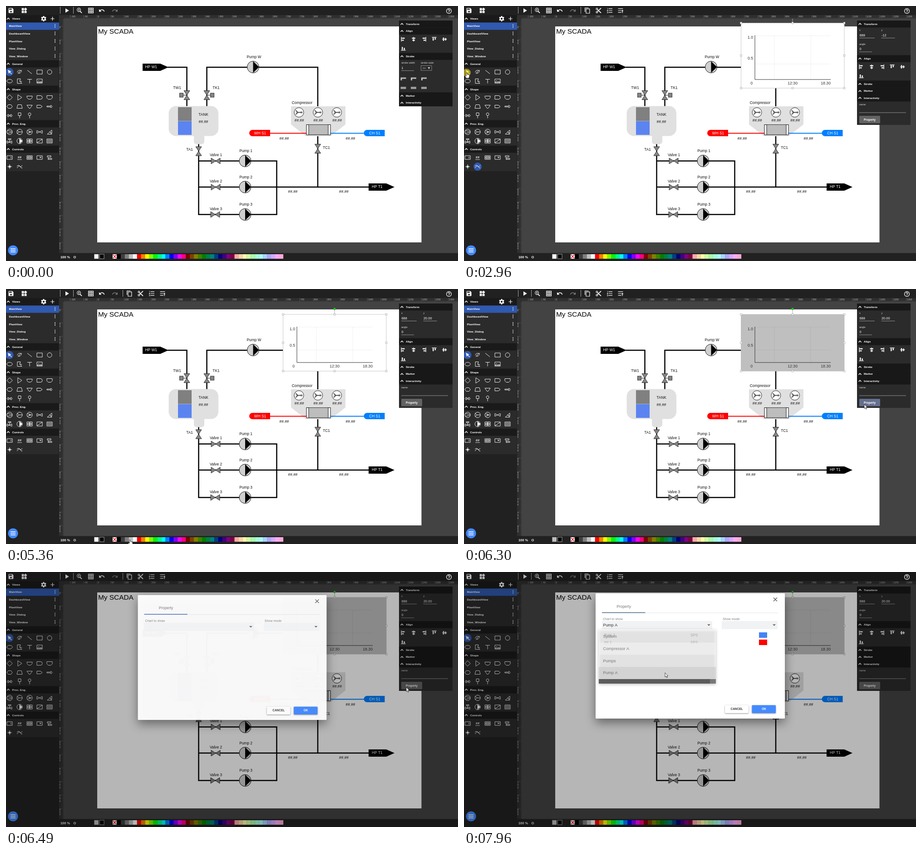
Animation of 996x562 px, one loop 8 s. Source, as an HTML page with a canvas:

```html
<!DOCTYPE html>
<html lang="en">
<head>
<meta charset="utf-8">
<title>View editor</title>
<style>
html, body { margin: 0; width: 100%; height: 100%; overflow: hidden; background: #434343; }
canvas { display: block; }
</style>
</head>
<body>
<canvas id="stage" width="996" height="562"></canvas>
<script>
const ctx = document.getElementById('stage').getContext('2d');
const LOOP = 8000, UNIT = 0.5954, ORIGIN = { x: 201, y: 45 };
const BLUE = '#3059af', ACCENT = '#448aff', HASH = '##.##';
const clamp = v => Math.max(0, Math.min(1, v));
const ramp = (t, from, to) => clamp((t - from) / (to - from));
const lerp = (a, b, p) => a + (b - a) * p;

// ---- drawing helpers ----
function box(x1, y1, x2, y2, fill, stroke, lw = 1) {
  if (fill) { ctx.fillStyle = fill; ctx.fillRect(x1, y1, x2 - x1, y2 - y1); }
  if (stroke) { ctx.strokeStyle = stroke; ctx.lineWidth = lw; ctx.strokeRect(x1, y1, x2 - x1, y2 - y1); }
}
function rounded(x1, y1, x2, y2, r, fill) {
  ctx.beginPath(); ctx.roundRect(x1, y1, x2 - x1, y2 - y1, r);
  ctx.fillStyle = fill; ctx.fill();
}
function text(s, x, y, size = 8.34, color = '#111', align = 'left', weight = '') {
  ctx.font = `${weight} ${size}px "Liberation Sans", Arial, sans-serif`;
  ctx.textAlign = align; ctx.textBaseline = 'middle';
  ctx.fillStyle = color; ctx.fillText(s, x, y + 0.4);
}
const bold = (s, x, y, size = 6.25, color = '#fff', align) => text(s, x, y, size, color, align, 'bold');
function shape(d, x, y, fill, stroke, lw = 1, scale = 1, turn = 0) {
  const path = new Path2D(d);
  ctx.save(); ctx.translate(x, y); ctx.scale(scale, scale); ctx.rotate(turn);
  if (fill) { ctx.fillStyle = fill; ctx.fill(path, 'evenodd'); }
  if (stroke) { ctx.strokeStyle = stroke; ctx.lineWidth = lw / scale; ctx.stroke(path); }
  ctx.restore();
}
const line = (d, color = '#000', lw = 2.5) => shape(d, 0, 0, null, color, lw);
const ring = r => `M${-r} 0A${r} ${r} 0 1 0 ${r} 0A${r} ${r} 0 1 0 ${-r} 0z`;
const disc = (x, y, r, fill, stroke, lw) => shape(ring(r), x, y, fill, stroke, lw);
// A leading "!" marks a filled icon, otherwise it is outlined.
function icon(d, x, y, color = '#eee') {
  if (d[0] === '!') shape(d.slice(1), x, y, color); else shape(d, x, y, null, color, 1);
}
const material = (d, x, y, color = '#fff') =>
  shape(d, x - 7.2, y - 7.2, color, null, 1, 0.6);
const withShadow = (blur, dy, draw) => {
  ctx.save(); ctx.shadowColor = 'rgba(0,0,0,.45)'; ctx.shadowBlur = blur; ctx.shadowOffsetY = dy;
  draw(); ctx.restore();
};

// ---- icons ----
const TOP = {
  save: 'M17 3H5a2 2 0 0 0-2 2v14a2 2 0 0 0 2 2h14a2 2 0 0 0 2-2V7zM12 19a3 3 0 1 1 0-6 3 3 0 0 1 0 6zM15 9H5V5h10z',
  widgets: 'M3 3h8v8H3zM3 13h8v8H3zM13 13h8v8h-8zM17 1l6 6-6 6-6-6z',
  play: 'M7 4v16l13-8z',
  zoom: 'M9.5 2a7.5 7.5 0 0 1 6 12l6 6-2 2-6-6a7.5 7.5 0 1 1-4-14zM9.500 4a5.500 5.500 0 1 0 0 11 5.500 5.500 0 0 0 0-11zM8.500 6.500h2v2h2v2h-2v2h-2v-2h-2v-2h2z',
  grid: 'M2 2h20v20H2zM4 4v4h4V4zM10 4v4h4V4zM16 4v4h4V4zM4 10v4h4v-4zM10 10v4h4v-4zM16 10v4h4v-4zM4 16v4h4v-4zM10 16v4h4v-4zM16 16v4h4v-4z',
  undo: 'M12.500 8c-2.600 0-5 1-6.900 2.600L2 7v9h9l-3.600-3.600a8 8 0 0 1 12.700 3.600l2.400-.8A10.500 10.500 0 0 0 12.500 8z',
  redo: 'M18.400 10.600A10.500 10.500 0 0 0 1.500 15.200l2.400.8a8 8 0 0 1 12.700-3.600L13 16h9V7z',
  copy: 'M16 1H4a2 2 0 0 0-2 2v14h2V3h12zM6 5h15v18H6zM8 7v14h11V7z',
  cut: 'M10 12L7.600 9.600a4 4 0 1 1 2-2L22 20v1h-3l-7-7-2.400 2.400a4 4 0 1 1-2-2zM6 4a2 2 0 1 0 0 4 2 2 0 0 0 0-4zM6 16a2 2 0 1 0 0 4 2 2 0 0 0 0-4zM19 3l-6 6 2 2 7-7V3z',
  order: 'M8 4h14v2H8zM8 11h14v2H8zM8 18h14v2H8zM3 3h2v5H4V4H3zM2 10h4v1l-2 3h2v1H2v-1l2-3H2zM2 17h4v5H2v-1h3v-1H3v-1h2v-1H2z',
  raise: 'M2 4h18v2H2zM2 11h12v2H2zM2 18h12v2H2zM18 9l4 5h-3v7h-2v-7h-3z',
  gear: 'M10 2h4l.5 3 2 1 3-1 2 3.500-2.300 2v3l2.300 2-2 3.500-3-1-2 1-.5 3h-4l-.5-3-2-1-3 1-2-3.500 2.300-2v-3l-2.300-2 2-3.500 3 1 2-1zM12 8.500a3.500 3.500 0 1 0 0 7 3.500 3.500 0 0 0 0-7z',
  plus: 'M11 5h2v6h6v2h-6v6h-2v-6H5v-2h6z',
  help: 'M12 2a10 10 0 1 0 .01 0zM12 4a8 8 0 1 1-.01 0zM11 16h2v2h-2zM8 10a4 4 0 1 1 6 3.300c-.8.500-1 .9-1 1.700h-2c0-2 .8-2.600 1.800-3.300A2 2 0 1 0 10 10z'
};
const FAN = 'M-1 0L-6-4M-1 0L-6 4M-1 0H6';
const SLAB = 'M-6-4.500H6V4.500H-6z';
const TOOLS = [
  [145.5, ['!M-4-5L4-1 1 0 5 4 4 5 0 1-2 4z', 'M-5 1C-5-5 4-5 4-2S-2 5-2 2 3-3 5-4M-4 4L0 0', 'M-5-4L5 4', SLAB, ring(5)]],
  [165.5, ['M-6 0A6 4 0 1 0 6 0A6 4 0 1 0-6 0z', 'M-5-5H2L0 0 5 5H-5zM0 0L5 1', 'M-5-4H5M0-4V5', SLAB + 'M-5 3L-2-1 1 2 3 0 5 3z']],
  [201.5, ['M0-6L6 0 0 6-6 0z', 'M-4-6L5 0-4 6z', 'M-6-3H6C6 2 3 4 0 4S-6 2-6-3z', 'M-6-4H2A4 4 0 0 1 2 4H-6z', 'M-6-4H6V1L3 4H-3L-6 1z']],
  [221.5, ['M-3-4H3L6 0 3 4H-3L-6 0z', 'M-4-4H4L6 4H-6z', 'M-6-3H6L1 4H-1z', 'M-6-3H2L6 0 2 3H-6z', 'M-6-1H3V-3L6 0 3 3V1H-6z']],
  [241.5, ['M-6 0L-3-3V-1H3V-3L6 0 3 3V1H-3V3z', 'M-3-6H3V0H-3zM0 0V6', 'M-3-3A3 3 0 1 0 3-3A3 3 0 1 0-3-3zM0 0V6']],
  [277.5, [ring(6) + 'M-5-3L6-1M-5 3L6 1', ring(6) + FAN, ring(6) + 'M-5-3L2-1M-5 3L2 1M-2 0H5', 'M-6-3L6 3V-3L-6 3z', 'M-5 5L0 0 5 5zM0 0L5-4V3z']],
  [297.5, ['M-6 0V5L5 0V5zM0 2V-3M-3-5H3V-3H-3z', ring(6) + 'M0-5L6 0 0 5z', SLAB + 'M-5-2L3 4M-3-4L5 2M-5 2L3-4M-3 4L5-2M-5 0H5M0-4V4', SLAB + 'M-6 4L6-4', SLAB]],
  [334, ['M-6-4H6V4H-6zM3-2V2', '', 'M-6-4H6V4H-6zM-4-2H4V2H-4zM-4 0H4', 'M-6-4H6V4H-6zM0-1H4L2 1z', 'M-5-4H3V-1H-5zM-3 0V5M-3 4H5V2H-3']],
  [354, ['!' + ring(2.5) + 'M-.5-5h1v2h-1zM-.5 3h1v2h-1zM-5-.5h2v1h-2zM3-.5h2v1h-2z', 'M-6 3L-1-2 2 1 6-3M-6-1L-3-3 1-1 4 3H6']]
];
const columnX = i => 8 + 22 * i;
const ALIGN = [
  '!M-5-5h1.500V5h-1.500zM-3-3.500h6v2.500h-6zM-3 1h4v2.500h-4z', '!M-.7-5H.7v1.500h3v2.500h-3v2h2V3.500h-2V5H-.7V3.500h-2V1h2v-2h-3v-2.500h3z',
  '!M3.500-5h1.500V5h-1.500zM-3-3.500h6v2.500h-6zM-1 1h4v2.500h-4z', '!M-5-5H5v1.500H-5zM-3.500-3h2.500v6h-2.500zM1-3h2.500v4h-2.500z',
  '!M-5-.7h1.500v-3H-1v3h2v-2h2.500v2H5V.7H3.500v2H1v-2h-2v3h-2.500v-3H-5z', '!M-5 3.500H5V5H-5zM-3.500-3h2.500v6h-2.500zM1-1h2.500v4h-2.500z'
];

// ---- timeline ----
const SELECT_CHART = 1150, PLACE = 2050, SELECT_ARROW = 3030, DROP = 4430,
      FILL = 5450, OPEN = 6400, LIST = 7280, PICK = 7740;
const POINTER = [
  [310, 744, 513], [1010, 29, 336], [1100, 29, 351], [1290, 29, 351], [1670, 541, 192], [2050, 685, 99],
  [2140, 685, 99], [2480, 450, 205], [2730, 110, 185], [2900, 6, 147], [3040, 6, 147], [3500, 724, 43],
  [3620, 724, 43], [4060, 724, 56], [4400, 724, 56], [5190, 285, 543], [5300, 273, 553], [5460, 273, 553],
  [6020, 965, 340], [6150, 895, 268], [6260, 882, 254], [6530, 882, 254], [6850, 670, 298],
  [7180, 543, 114], [7330, 543, 114], [7640, 443, 222], [LOOP, 443, 222]
];
const PRESSES = [[1100, 1250], [2040, 2200], [2880, 3040], [3500, 4420], [5400, 5500], [6340, 6440], [7240, 7330], [7690, 7760]];
const HANDS = [[1060, 1330], [2870, 3080], [5260, 5480]];
const during = (spans, t) => spans.some(([a, b]) => t >= a && t < b);

function pointerAt(t) {
  const i = POINTER.findIndex(p => p[0] > t);
  if (i < 1) return null;
  const [a, b] = [POINTER[i - 1], POINTER[i]], p = ramp(t, a[0], b[0]);
  return { x: lerp(a[1], b[1], p), y: lerp(a[2], b[2], p) };
}

// ---- diagram ----
const BOWTIE = 'M-6.500-10H6.500L-6.500 10H6.500z';
const valve = (x, y, flat) => shape(BOWTIE, x, y, '#858585', '#222', 0.9, 1, flat ? Math.PI / 2 : 0);
function motorValve(x, y, side) {
  line(`M${x} ${y}H${x + side * 9}`, '#222', 1);
  valve(x, y);
  box(x + side * 12 - 4, y - 4.5, x + side * 12 + 4, y + 4.5, '#858585', '#222', 0.9);
}
function pump(x, y) {
  disc(x, y, 13, '#d0d0d0', '#111', 1);
  shape('M0-12.800L13 0 0 12.800z', x, y, '#000');
}
function arrowTag(label, x, y) {
  shape('M0-8H39L57 0 39 8H0z', x, y, '#000');
  text(label, x + 5.500 + (x > 500 ? 1.500 : 0), y - 0.5, 8.34, '#fff');
}
function capsule(label, x, color) {
  rounded(x, 273, x + 46, 287, [7, 0, 0, 7], color);
  text(label, x + 24, 280, 8.34, '#fff', 'center');
}
function diagram() {
  box(ORIGIN.x, ORIGIN.y, 915.5, 521, '#fff');
  text('My SCADA', 203, 56, 15.4, '#000');
  line('M356 135H398.500V221M442.500 221V135H687V221M687 286V399M424.500 303V459.500H596.500V341.500H424.500M424.500 399H800');
  arrowTag('HP W1', 301, 135); arrowTag('HP T1', 799, 399);
  motorValve(398.5, 196.5, -1); motorValve(442.5, 196.5, 1);
  rounded(358.5, 220.5, 468, 286.5, 16, '#e0e0e0');
  rounded(414, 280, 437, 304.5, [0, 0, 6, 6], '#e0e0e0');
  box(379, 223, 409, 253.5, '#808080'); box(379, 254, 409, 284, '#5b84f1');
  valve(424.5, 320); valve(687, 314.5);
  valve(462, 341.5, true); valve(462, 399.2, true); valve(461, 459.5, true);
  pump(544.5, 134.5); pump(527, 341.5); pump(527, 399); pump(527, 459.5);
  shape('M628 221H748V261L715 287H661L628 261z', 0, 0, '#e0e0e0');
  line('M582 280.500H662', '#f00', 2.2); line('M715 280.500H790', '#007fff', 2.2);
  capsule('WH S1', 536, '#f00'); capsule('CH S1', 788.5, '#007fff');
  for (const x of [645.5, 687.3, 729]) {
    disc(x, 234.5, 10.5, '#fff', '#222', 1);
    shape('M-1 0L-7-5-5.500-1zM-1 0L-7 5-5.500 1zM-1 0L7-1.500V1.500z', x, 234.5, '#bbb', '#111', 0.8);
    text(HASH, x + 0.7, 252, 8.34, '#111', 'center');
  }
  box(662, 261.5, 715, 284, '#fff', '#111', 1);
  line('M667 261V284M710 261V284', '#111', 1);
  for (let y = 264; y < 283; y += 3) line(`M667 ${y}H710`, '#222', 0.9);
  [['TANK', 435, 239.5], [HASH, 435, 255], [HASH, 613, 292], [HASH, 759, 292], [HASH, 632, 409], [HASH, 744.5, 409],
   ['Pump W', 546.5, 112], ['TW1', 377, 180], ['TK1', 463, 180], ['TA1', 404.5, 316], ['TC1', 706, 312.5],
   ['Compressor', 652.5, 213.5], ['Pump 1', 528.5, 319.5], ['Pump 2', 528.5, 377], ['Pump 3', 528.5, 437.5],
   ['Valve 1', 462.5, 328], ['Valve 2', 462.5, 386], ['Valve 3', 462.5, 447]
  ].forEach(([s, x, y]) => text(s, x, y, 8.34, '#111', 'center'));
}
function chart(t) {
  const top = lerp(37.5, 56, ramp(t, 3640, 4060)), axisTop = top + 27;
  box(610.5, top, 838, 181, t < FILL + 40 ? '#fff' : '#bfbfbf', '#bbb', 0.8);
  const ridge = lerp(axisTop, 162, 0.65);
  line(`M684 ${axisTop}V162M764 ${axisTop}V162M641 ${axisTop + 1}H808M641 ${ridge}H808`, 'rgba(0,0,0,.06)', 1);
  line(`M641 ${axisTop}V162H808`, '#333', 1);
  [['1.0', 637, axisTop + 5], ['0.5', 637, (axisTop + 162) / 2 + 1.5], ['0', 636, 170], ['12:30', 735, 170], ['18.30', 808, 170]]
    .forEach(([s, x, y]) => text(s, x, y, 8.7, '#333', 'right'));
  line(`M724 ${top - 10}V${top}`, '#aaa', 1);
  disc(724, top - 12, 2.5, '#1fc41f');
  const mid = (top + 181) / 2;
  for (const x of [610.5, 724, 838]) for (const y of [top, mid, 181])
    if (x !== 724 || y !== mid) box(x - 1.8, y - 1.8, x + 1.8, y + 1.8, '#fff', '#aaa', 0.8);
}

// ---- editor frame ----
function rulers() {
  box(117, 20, 996, 28, '#2f2f2f'); box(117, 28, 127, 545, '#2f2f2f');
  for (let u = -140; u <= 1330; u += 5) {
    const x = ORIGIN.x + u * UNIT, y = ORIGIN.y + u * UNIT, major = u % 50 === 0;
    if (x > 127) line(`M${x} ${major ? 20 : 26}V28`, major ? '#777' : '#666', 0.6);
    if (y > 28 && y < 544) line(`M${major ? 117 : 125} ${y}H127`, major ? '#666' : '#666', 0.6);
    if (!major) continue;
    if (u >= -100) text(u, x + 1.5, 23.3, 5, '#bbb');
    if (u >= 0 && y < 540) [...String(u)].forEach((c, i) => text(c, 117.5, y + 2.5 + i * 5.4, 5, '#bbb'));
  }
}
const chevron = (x, y) => line(`M${x - 3} ${y + 1.5}L${x} ${y - 1.5}L${x + 3} ${y + 1.5}`, '#fff', 1.4);
function sideHeader(label, y) {
  box(0, y - 8, 116, y + 8, '#1a1a1a');
  chevron(5, y); bold(label, 13.5, y);
}
function sidebar(t) {
  box(0, 19, 117, 562, '#212121');
  box(0, 36, 116, 364, '#2b2b2b');
  sideHeader('Views', 28);
  material(TOP.gear, 83, 28); material(TOP.plus, 102.5, 28);
  box(0, 36.5, 117, 52.5, BLUE);
  ['MainView', 'DashboardView', 'PlantView', 'View_Dialog', 'View_Window'].forEach((name, i) => {
    const y = 44.3 + i * 16.6;
    bold(name, 6.5, y);
    for (const d of [-3, 0, 3]) disc(108, y + d - 0.5, 0.9, '#fff');
  });
  [['General', 127.5], ['Shape', 183.5], ['Proc. Eng.', 259.5], ['Controls', 315.5]].forEach(h => sideHeader(...h));
  const chartTool = t >= SELECT_CHART && t < SELECT_ARROW;
  disc(chartTool ? 30 : 7.5, chartTool ? 354 : 145.5, 9, BLUE);
  for (const [y, icons] of TOOLS) icons.forEach((d, i) => d && icon(d, columnX(i), y));
  bold('##', 30, 333.5, 7.5, '#eee', 'center'); line('M25 338.500H35', '#eee', 0.8);
  shape('M0-5L6 0 0 5z', 30, 297.5, '#fff');
  box(90.5, 293.5, 101.500, 301.500, '#777');
  disc(15.5, 538.5, 11, ACCENT);
  line('M10 535H21M10 538.500H21M10 542H21', '#fff', 1.4);
}
function topBar(selected) {
  box(0, 0, 996, 20, '#212121');
  line('M119.500 2V17M148.500 2V17', '#aaa', 1);
  [['save', 11], ['widgets', 40], ['play', 134], ['zoom', 162], ['grid', 187], ['undo', 211]].forEach(([n, x]) => material(TOP[n], x, 10));
  material(TOP.redo, 240, 10, '#777');
  if (!selected) return;
  line('M257.500 2V17', '#aaa', 1);
  ['copy', 'cut', 'order', 'raise'].forEach((n, i) => material(TOP[n], 272 + i * 24.5, 10));
}
function bottomBar(t) {
  box(117, 544.5, 996, 562, '#212121');
  bold('100 %', 120, 554, 7.4); bold('O', 148.5, 554, 7.4);
  box(194.5, 547, 204, 557, t < FILL ? '#fff' : '#bfbfbf', '#888', 0.6);
  box(206.5, 547, 216, 557, '#000', '#ccc', 0.8);
  const colors = ['#000', '#3f3f3f', '#7f7f7f', '#bfbfbf', '#fff'];
  for (const light of [50, 25, 83.3]) for (let h = 0; h < 360; h += 30) colors.push(`hsl(${h} 100% ${light}%)`);
  const cell = 8.95, left = 235;
  box(left, 547, left + cell, 557, '#fff');
  line('M236 548L243 556M243 548L236 556', '#f00', 1.2);
  colors.forEach((c, i) => box(left + (i + 1) * cell, 547, left + (i + 2) * cell + 0.2, 557, c));
}
function panel(t, selected) {
  const header = (label, y) => { box(866, y - 7.7, 984, y + 7.7, '#181818'); chevron(872.5, y); bold(label, 881, y, 6.1); };
  const field = (label, value, x, y, w) => {
    text(label, x, y, 5.6, '#ddd'); text(value, x + 0.5, y + 11, 7.4, '#fff');
    line(`M${x} ${y + 17}H${x + w}`, '#aaa', 0.8);
  };
  box(866, 32, 984, selected ? 262 : 221, '#2b2b2b');
  header('Transform', 39.7);
  const alignY = selected ? 116 : 55.2;
  header('Align', alignY);
  ALIGN.forEach((d, i) => icon(d, 875.5 + (i % 5) * 22.7, alignY + 18 + (i > 4 ? 20 : 0)));
  if (selected) {
    field('x', '688', 871, 53.5, 34); field('y', t < DROP ? '-12' : '20.00', 919.5, 53.5, 30);
    field('angle', '0', 871, 84, 28);
    header('Stroke', 172); header('Marker', 187.4); header('Interactivity', 202.8);
    text('name', 871, 217, 5.6, '#ddd'); line('M871 235H974', '#aaa', 0.8);
    rounded(871, 242, 917, 258.5, 1.5, t > 6220 && t < OPEN ? '#65708f' : '#636363');
    bold('Property', 894, 250.5, 6.3, '#fff', 'center');
  } else {
    header('Stroke', 111);
    field('stroke width', '1', 871, 125.5, 28);
    text('stroke style', 914, 125.5, 5.6, '#ddd');
    box(914.5, 131.5, 938, 142, null, '#999', 0.8);
    line('M918 137H925', '#ddd', 0.8); shape('M-2.500-2H2.500L0 2z', 932, 137, '#ddd');
    for (const x of [875.5, 898, 921]) {
      icon('!M-6-2.500H6V.5H-3V4H-6z', x, 160, '#bbb');
      icon('!M-6-2.500H6V2.500H-6z', x, 180.5, '#999');
    }
    header('Marker', 198); header('Interactivity', 213.4);
  }
}

// ---- dialog ----
function dropdown(t) {
  ctx.save();
  ctx.globalAlpha *= ramp(t, LIST, LIST + 120) * (1 - 0.45 * ramp(t, PICK, 7950));
  withShadow(6, 2, () => box(297, 126, 555, 246, '#fff'));
  const pointer = pointerAt(t);
  ['System', 'Compressor A', 'Pumps', 'Pump A'].forEach((name, i) => {
    const y = 142.2 + i * 26.8;
    const hover = t >= PICK ? i === 3 : pointer.x < 555 && Math.abs(pointer.y - y) < 13.4;
    if (hover) box(297, y - 13.4, 555, y + 13.4, '#c6c6c6');
    else if (i === 1) box(297, y - 13.4, 555, y + 13.4, '#f5f5f5');
    text(name, 306.5, y, 9, '#222');
  });
  box(297, 236, 555, 246, '#222'); box(297, 236, 542, 246, '#454545');
  ctx.restore();
}
function dialog(t) {
  const p = 1 - (1 - ramp(t, OPEN, OPEN + 150)) ** 5;
  box(0, 0, 996, 562, `rgba(0,0,0,${0.288 * p})`);
  ctx.save();
  ctx.globalAlpha = p ** 5;
  ctx.translate(498.5, 185 + 3.5 * (1 - ramp(t, 6490, 6640)));
  ctx.scale(0.7 + 0.3 * p, 0.7 + 0.3 * p);
  ctx.translate(-498.5, -185);
  withShadow(22, 9, () => rounded(290, 47, 707, 323, 1.5, '#fff'));
  line('M682 56.500L690 64.500M690 56.500L682 64.500', '#555', 1.3);
  text('Property', 352, 76, 8.4, '#777', 'center');
  line('M304 90H692', '#ddd', 0.8); line('M304 89.500H399.500', t < 6800 ? '#3f6bc0' : '#4d6c8a', 1.5);
  for (const [label, x1, x2] of [['Chart to show', 304, 547], ['Show mode', 568, 691]]) {
    text(label, x1 + 2, 103.7, 7.1, '#808080');
    rounded(x1, 108, x2, 126, 1.5, '#f1f2f4');
    shape('M-3.500-1.700H3.500L0 1.800z', x2 - 7.500, 117, '#666');
  }
  withShadow(3, 1, () => { rounded(575, 293.5, 627, 311, 1.5, '#fff'); rounded(634.5, 293.5, 687, 311, 1.5, ACCENT); });
  bold('CANCEL', 601, 302, 6.5, '#333', 'center'); bold('OK', 661, 302, 6.5, '#fff', 'center');
  if (t >= PICK) {
    text('Pump A', 306.5, 117, 8.9, '#333');
    [['Byte 2', 139, '#4285f4'], ['Int 1', 155, '#f00']].forEach(([name, y, color]) => {
      text(name, 309, y, 8.5, '#555'); text('SPS', 499, y, 8.3, '#555');
      box(650, y - 6, 668, y + 6, color);
    });
  }
  if (t >= LIST) dropdown(t);
  ctx.restore();
}
function pointer(t) {
  const p = pointerAt(t);
  if (!p) return;
  if (during(PRESSES, t)) disc(p.x, p.y, 8.8, 'rgba(235,215,20,.6)');
  if (during(HANDS, t)) shape('M-1 0H1V4H3L6 5.500V8L4.500 12H-1L-4 7-3 6-1 8z', p.x, p.y, '#fff', '#222', 0.7);
  else shape('M0 0V9.500L2.200 7.600 3.800 11 5.300 10.300 3.800 7H6.600z', p.x, p.y, '#fff', '#222', 0.8);
}

function render(t) {
  const selected = t >= PLACE;
  box(0, 0, 996, 562, '#434343');
  diagram();
  if (selected) chart(t);
  topBar(selected); rulers(); sidebar(t); bottomBar(t); panel(t, selected);
  if (t >= OPEN) dialog(t);
  material(TOP.help, 976, 11);
  pointer(t);
}
function tick(now) {
  render(now % LOOP);
  requestAnimationFrame(tick);
}
render(0);
const start = performance.now();
requestAnimationFrame(function loop() {
  tick.start = start;
  render((performance.now() - start) % LOOP);
  requestAnimationFrame(loop);
});
</script>
</body>
</html>
```
